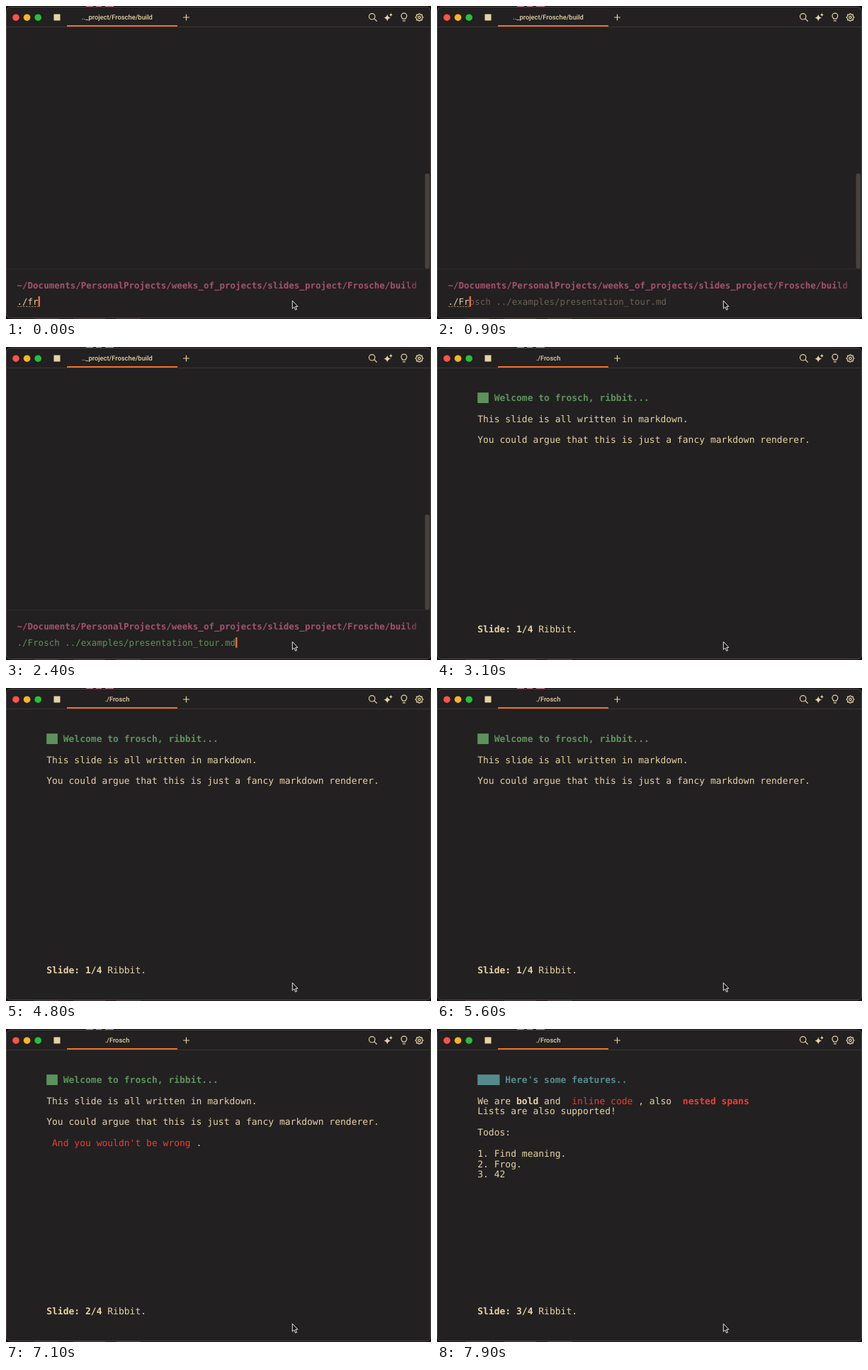
Recreate the animation shown at these times as an HTML page. Size 600x441 px, loop 8000 ms.

```html
<!DOCTYPE html>
<html lang="en">
<head>
<meta charset="utf-8">
<title>Terminal slides</title>
<style>
  html, body { margin: 0; width: 100%; height: 100%; overflow: hidden; background: #141112; }
  svg { display: block; width: 600px; height: 441px; }
  text { white-space: pre; text-rendering: geometricPrecision; fill: #e6d4a3; }
  .mono { font-family: "DejaVu Sans Mono", "Noto Sans Mono", monospace; }
  .cmd { font-size: 12.5px; }
  .slide { font-size: 13px; }
  .b { font-weight: 700; }
  .green { fill: #5c935c; }
  .teal { fill: #568b8d; }
  .red { fill: #ee3d35; }
  .hint { fill: #696257; }
  .tab { font: 500 9.35px Roboto, sans-serif; text-anchor: middle; }
  .icon { fill: none; stroke: #e6d4a3; stroke-width: 1.2; stroke-linecap: round; stroke-linejoin: round; }
</style>
</head>
<body>
<svg viewBox="0 0 600 441" xmlns="http://www.w3.org/2000/svg">
  <defs>
    <linearGradient id="fade" gradientUnits="userSpaceOnUse" x1="560" x2="586" y1="0" y2="0">
      <stop offset="0" stop-color="#a5506f"/>
      <stop offset="1" stop-color="#a5506f" stop-opacity=".35"/>
    </linearGradient>
  </defs>

  <!-- desktop showing around the window -->
  <rect width="600" height="441" fill="#141112"/>
  <path d="M113 0h10v1.2h-10zM127 0h8v1.2h-8zM140 0h12v1.2h-12z" fill="#c9748c"/>
  <path d="M40 440h34v1h-34zM95 440h45v1h-45zM156 440h34v1h-34z" fill="#39302f"/>

  <!-- window -->
  <rect x=".5" y="1.5" width="599" height="438" rx="6" fill="#222021" stroke="#4d4744"/>
  <path d="M1 29.5H599" stroke="#3a3634"/>
  <rect x="86" y="27" width="156" height="2" fill="#e96f30"/>
  <circle cx="14" cy="16.2" r="4.8" fill="#ff5249"/>
  <circle cx="29.6" cy="16.2" r="4.8" fill="#fdb424"/>
  <circle cx="45.2" cy="16.2" r="4.8" fill="#25c138"/>
  <rect x="67.5" y="11.5" width="9" height="9" fill="#e6d4a3"/>
  <text class="tab" id="tab" x="157" y="19.3"></text>

  <g class="icon">
    <path d="M254.5 12V20M250.5 16H258.5"/>
    <circle cx="516.7" cy="14.8" r="4.2"/>
    <path d="M519.8 17.9L523.3 21.3"/>
    <path d="M560 18.2C559.6 16.9 558 16.2 558 14A3.9 3.9 0 0 1 565.8 14C565.8 16.2 564.2 16.9 563.8 18.2ZM560.4 20.9H563.4"/>
    <path id="gear"/>
    <circle cx="583.5" cy="16" r="1.7"/>
  </g>
  <path d="M538.2 11.6Q538.9 16 543.2 16.8Q538.9 17.5 538.2 21.6Q537.5 17.5 533.4 16.8Q537.5 16 538.2 11.6ZM543.4 9.8Q543.7 12 545.8 12.4Q543.7 12.8 543.4 14.9Q543 12.8 541 12.4Q543 12 543.4 9.8Z" fill="#e6d4a3"/>

  <g id="shell">
    <rect x="591.5" y="236" width="6.5" height="134" rx="3" fill="#47423d"/>
    <path d="M1 370.5H599" stroke="#302d2d"/>
    <text class="mono cmd b" x="15.5" y="397.8" style="fill:url(#fade)">~/Documents/PersonalProjects/weeks_of_projects/slides_project/Frosche/build</text>
    <text class="mono cmd" x="15.5" y="420.7"><tspan id="typed"></tspan><tspan id="hint" class="hint"></tspan></text>
    <path id="dash" stroke="#91845f" stroke-dasharray="2.5 1.5"/>
    <rect id="caret" y="409" width="2.4" height="14.6" fill="#ff6a38"/>
  </g>
  <g id="slides"></g>

  <path d="M404.3 415.2V426.3L406.8 424L408.6 428.2L410.5 427.4L408.7 423.3H411.9Z" fill="#151314" stroke="#e8e6e4" stroke-width="1" stroke-linejoin="round"/>
</svg>

<script>
const LOOP = 8000, LEFT = 57.2, CELL = 7.826, ROW = 14.83;
const CMD_CELL = 7.525;
const COMMAND = './Frosch ../examples/presentation_tour.md';

const typing = [
  [0, './fr'], [300, './f'], [400, './'], [600, './F'], [800, './Fr'], [1900, COMMAND]
];
const pages = [[0, -1], [2900, 0], [6000, 1], [7500, 2]];

const $ = id => document.getElementById(id);
const at = (steps, t) => steps.filter(s => s[0] <= t).pop()[1];
const span = (cls, s) => `<tspan class="${cls}">${s}</tspan>`;
const line = (row, s) =>
  `<text class="mono slide" x="${LEFT}" y="${76 + row * ROW}">${s}</text>`;

// heading: block of cells, then a bold title one cell further
const heading = (color, cells, s) =>
  `<rect class="${color}" x="${LEFT}" y="64.2" width="${cells * CELL}" height="${ROW}"/>` +
  `<text class="mono slide b ${color}" x="${LEFT + (cells + 1) * CELL}" y="76">${s}</text>`;
const footer = n => line(22, span('b', `Slide: ${n}/4`) + ' Ribbit.');

const intro = heading('green', 2, 'Welcome to frosch, ribbit...') +
  line(2, 'This slide is all written in markdown.') +
  line(4, 'You could argue that this is just a fancy markdown renderer.');

const slides = [
  intro,
  intro + line(6, ' ' + span('red', "And you wouldn't be wrong") + ' .'),
  heading('teal', 4, "Here's some features..") +
    line(2, `We are ${span('b', 'bold')} and  ${span('red', 'inline code')} , also  ${span('red b', 'nested spans')}`) +
    line(3, 'Lists are also supported!') +
    line(5, 'Todos:') +
    ['1. Find meaning.', '2. Frog.', '3. 42'].map((s, i) => line(7 + i, s)).join('')
];
$('slides').innerHTML = slides.map((s, i) => `<g>${s}${footer(i + 1)}</g>`).join('');

const teeth = [];
for (let i = 0; i < 32; i++) {
  const a = (i - 0.5) * Math.PI / 16, r = i % 4 < 2 ? 5.3 : 4.1;
  teeth.push((583.5 + r * Math.cos(a)).toFixed(2) + ' ' + (16 + r * Math.sin(a)).toFixed(2));
}
$('gear').setAttribute('d', 'M' + teeth.join('L') + 'Z');

function drawShell(text) {
  const done = text === COMMAND;
  const match = text.length > 2 && COMMAND.startsWith(text);
  const end = 15.5 + text.length * CMD_CELL;
  $('typed').textContent = text;
  $('typed').setAttribute('class', done ? 'green' : '');
  $('hint').textContent = match ? COMMAND.slice(text.length) : '';
  $('dash').setAttribute('d', done ? '' : `M16 423.5H${end}`);
  $('caret').setAttribute('x', end);
}

let last = '';
function frame() {
  const t = performance.now() % LOOP;
  const page = at(pages, t), text = at(typing, t);
  if (last !== page + text) {
    last = page + text;
    $('shell').style.display = page < 0 ? '' : 'none';
    $('tab').textContent = page < 0 ? '.._project/Frosche/build' : './Frosch';
    [...$('slides').children].forEach((g, i) => g.style.display = i === page ? '' : 'none');
    drawShell(text);
  }
  requestAnimationFrame(frame);
}
frame();
</script>
</body>
</html>
```
